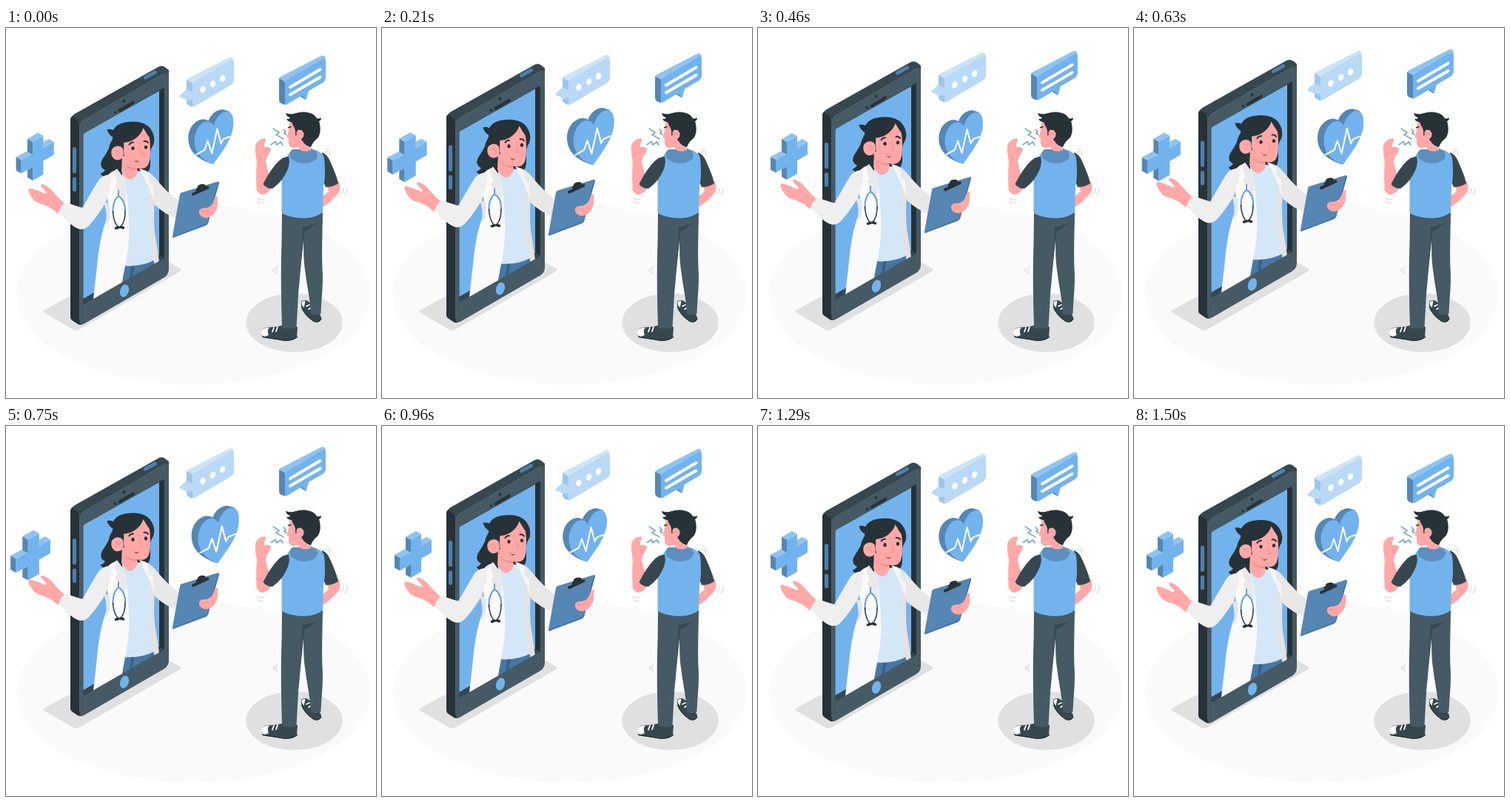
An HTML page for the animation above (1.54 s loop, 500x500 px).

```html
<!DOCTYPE html>
<html lang="en">
<head>
<meta charset="utf-8">
<title>Online doctor</title>
<style>
html, body { margin: 0; width: 100%; height: 100%; overflow: hidden; background: #fff; }
svg { display: block; width: 100vw; height: 100vh; }
.k { fill: #263238; } .g { fill: #37474f; } .m { fill: #455a64; }
.b { fill: #73b3ed; } .d { fill: #5586b4; } .t { fill: #8fc3f2; }
.s { fill: #ffa8a7; } .w { fill: #fff; }
.line { fill: none; stroke-linecap: round; stroke-linejoin: round; }
.mark { stroke: #dcdcdc; stroke-width: 1.2; }
</style>
</head>
<body>
<svg viewBox="0 0 500 500">
<defs>
  <clipPath id="sill"><path d="M90 100H240V296L119 365.5L90 382Z"/></clipPath>
</defs>

<ellipse cx="253.5" cy="360" rx="239" ry="122" fill="#fafafa"/>
<ellipse cx="389.5" cy="398.3" rx="65.2" ry="39.8" fill="#e0e0e0"/>
<path d="M52 381Q49 383 52 385L91 407.500Q95 410 99 407.500L235 329Q238 327 235 325L197 303Z" fill="#e0e0e0"/>

<!-- Patient -->
<g id="patient">
  <path class="g" d="M399 370C403 366 410 368 414 376C419 384 426 386 426 392C426 398 419 399 414 395C407 389 400 382 399 376Z"/>
  <path class="line" d="M399.500 377C402 386 411 393 416 396.500Q422 399 426 393" stroke="#263238" stroke-width="1.2"/>
  <path class="line" d="M406 376l4-2M409 380l4-2.500" stroke="#fff" stroke-width="1.6"/>
  <path class="w" d="M399.500 371q2-3 5-2l-2 9q-3-3-3-7"/>
  <path class="g" d="M373 402C366 404 357 404 350 405Q344 407 345 414Q346 418 352 419L378 422.500Q390 423 393 417L394 404Z"/>
  <path class="w" d="M356 405Q345 404 344.500 412Q344.500 416 350 417L355 415Q352 408 356 405Z"/>
  <path class="line" d="M347 417.500Q362 419.500 375 422Q387 423 393.500 417.500" stroke="#263238" stroke-width="1.5"/>
  <path class="line" d="M362 405l-2 5.500M367 404l-2 6" stroke="#fff" stroke-width="1.8"/>

  <path class="m" d="M373 248L428 246C428 275 426 300 428 335C428 355 426 370 425.500 386Q419 390 412 386C411 365 406 345 404.500 330C402 315 402 300 402 276C400 305 397 340 395 360L392.500 405Q382 408 373 405C372 370 371 330 372.500 290Z"/>
  <path class="g" d="M403 275Q412 271 421 263Q411 268 401 269Q400 300 397 330Q401 300 403 275Z"/>

  <path class="s" d="M434 212L450 207Q453 216 450 222C444 230 436 237 428 242L427 228Q433 223 436 221Z"/>
  <path class="g" d="M427 168Q434 171 437 178C442 189 447 200 449 210Q442 215 432 215L428 205Z"/>

  <path class="b" d="M386 166C378 172 378 179 380 186L372.500 200V250Q384 257 403 257Q420 256 428 249L429 214C432 204 431 186 430 176Q429 169 419 165Z"/>
  <path class="s" d="M347 217C341 222 339 223 338.500 216C338 202 338 190 339 182C338 173 336 166 337 159Q339 152 346 150Q353 148 351 153Q348 156 349 161Q353 160 357.500 162Q359 165 356 169Q352 174 351 180C352 188 355 196 357 200L361 213Q354 224 347 225Q341 225 339.500 219Z"/>
  <path class="g" d="M382 174C373 173 365 183 360 190C354 198 350 206 347.500 211Q352 217 360 217C369 211 377 201 381 190Q384 181 382 174Z"/>
  <path d="M387 164C382 168 382 174 387 178Q397 185 410 182Q421 179 421 172Q421 166 413 163Z" fill="#5c8fbe"/>
  <path class="s" d="M384 124C382 133 383 139 379.700 146Q379 148 382 149L382 157Q383 162 389 162L396 161L396 164Q403 169 412 165L411 150L405 126Z"/>
  <path class="k" d="M386 127Q381 127 379 123Q383 123 384 121Q379 120 378 115Q384 117 388 116C395 114 400 113 407 114Q416 115 420 122Q424 123 426 121Q426 125 423 126C426 135 425 144 421 149C416 153 414 156 412 161Q407 160 403 156Q398 150 396 144L391 145Q392 137 388 132Z"/>
  <path class="s" d="M393 145C391 139 395 136 399 138Q404 141 402 147Q399 152 394 150Z"/>
  <path class="line" d="M395 143q3-2 5 1" stroke="#f28f8f" stroke-width="1"/>
  <path class="line" d="M381.500 134.500l3.500-1" stroke="#263238" stroke-width="1.4"/>
  <path class="line" d="M361 136L369 141L365 144.500L375 150M358 157.500L364 153.500L366 158L371 154L374 158M375 137L378 140L376 142.500L379 144" stroke="#5793cf" stroke-width="1.4"/>
  <path class="line mark" d="M431 167q5-1 7 5M433 164q5 0 6 5M456 216q1 5-3 8M460 216q3 4-2 10M339 230q6 3 10 1M340 234.500q4 3 8 2M363 324q-4 2 0 7M367 322q-4 4-1 10"/>
</g>

<!-- Everything that drifts up and down -->
<g id="float">
  <path class="g" d="M88 124Q88 119 93 116L206 52.500Q211 50 215 53L220 57V70L100 140Z"/>
  <path class="k" d="M87 123Q88 119 91 119L101 126L103 400.500Q99 402 96 399.500L90 395.500Q87 394 87 390Z"/>
  <path class="m" d="M99.500 134Q99.500 128 104 125L213 61.500Q220 58 220 64V326Q220 333 214 337L106 399.500Q99.500 403 99.500 396Z"/>
  <path class="line" d="M90 119.500L99 126Q99.500 128 99.500 134V395" stroke="#607580" stroke-width=".6"/>
  <path class="line" d="M100 129Q101 127 104 125L213 61.500" stroke="#607580" stroke-width=".6"/>
  <path class="line" d="M188.500 67L201.500 59.800" stroke="#4d7fae" stroke-width="5"/>
  <path class="line" d="M92.500 163.500V194M92.500 204V218.500" stroke="#4d7fae" stroke-width="5"/>
  <path class="line" d="M153.500 111.500L172 100.500" stroke="#263238" stroke-width="4"/>
  <circle class="k" cx="147.500" cy="114" r="1.800"/><circle class="k" cx="159.500" cy="98.500" r="2"/>
  <path class="k" d="M104.500 145Q104.500 143 106 142L212 81.500Q214 80.500 214 83V309Q214 311 212 312L107 372Q104.500 373 104.500 371Z"/>
  <path class="b" d="M104.500 145Q104.500 143 106 142L207 85V307L104.500 366Z"/>
  <path class="g" d="M104.500 366L207 307L214 311L106 372.500Q104.500 373 104.500 371Z"/>
  <ellipse class="b" cx="160" cy="355" rx="5.800" ry="8.700" transform="rotate(18 160 355)"/>

  <!-- Doctor -->
  <path class="k" d="M145 148Q138 144 136.500 137Q141 136 145 138C149 130 159 126.500 171 126.500C184 126 193 131 197 139C201 146 201 153 199 158C194 165 194 174 195 181Q196 194 187 199L176 200L148 203Q134 205 127.500 197Q132 195 134 192Q126 188 129 180C133 172 139 166 140 158Z"/>
  <g clip-path="url(#sill)">
    <path d="M158 316L204 306L208 330L155 352Z" fill="#4877a4"/>
    <path d="M169 321l5-1-4 20h-3Z" fill="#38608a"/>
    <path d="M157 192L189 194L201 220L200 256L202 313Q181 324 157 321Z" fill="#d4e7f9"/>
    <path d="M150 191C139 195 133 202 132 214C137 228 140 238 137 256C129 274 125 300 123 322L117 375L155 360C157 335 165 310 166 284C167 258 164 222 160 204Z" fill="#fafafa"/>
    <path d="M132 235Q138 251 134 269Q143 258 140 238Z" fill="#e6e6e6"/>
    <path d="M186 194L201 220L199 246C197 263 203 282 207 316L201 321C196 295 192 280 193 260C196 235 192 215 186 194Z" fill="#e3e3e3"/>
  </g>
  <path class="s" d="M157 172L176 184L178 194Q176 203 168 205Q161 204 156 194Z"/>
  <path d="M159 183Q168 190 177 189L177.500 192Q166 192 159 183Z" fill="#f28f8f"/>
  <path class="s" d="M157 150L186 134Q194 143 194.500 153C195.500 165 195 177 193 183Q190 190.500 182 190Q169 189 161 183Z"/>
  <path class="k" d="M144 145C150 130 178 126 188 133Q196 140 197 152Q191 145 185.500 135C182 147 170 154 159 155Q160 164 157 174L153 175Q144 160 144 145Z"/>
  <path class="s" d="M158 163C154 157 144 159 142.500 166C141 174 147 180 153 178Q158 177 159 170Z"/>
  <path class="line" d="M147 167q5-3 7 3" stroke="#f28f8f" stroke-width="1"/>
  <ellipse class="k" cx="171.500" cy="162.500" rx="2.200" ry="2.600"/><ellipse class="k" cx="189" cy="161" rx="2.200" ry="2.600"/>
  <path class="line" d="M166.500 157.500Q168 154.500 172 154.500M186.500 153Q190 152 192 155" stroke="#263238" stroke-width="2"/>
  <path class="line" d="M181 162L184.500 171L181 172.500" stroke="#f28f8f" stroke-width="1.100"/>
  <path d="M172 177Q176 179 180 177.500Q179 182 175.500 181Q173 180 172 177Z" fill="#a8484c"/>
  <path class="line" d="M173 178.500Q176 179.500 179 178.500" stroke="#fff" stroke-width=".9"/>

  <path class="s" d="M79 237Q72 231 66 224C61 217 54 212 49 211Q45 212 49 216L55 222L53 224Q43 219 33 216.500Q29 217 31 222C35 231 40 236 48 238C56 240 63 244 70 251Z"/>
  <path d="M143 198C132 198 127 202 123 209C116 220 110 232 103 243L80 235.500Q74 240 71.500 249C80 259 92 271 101 272Q108 272 113 266C121 257 129 246 135 235Q142 216 143 198Z" fill="#efefef"/>
  <path d="M102 243l5-1" stroke="#d5d5d5" stroke-width="1"/>
  <path d="M150 190Q146 193 147 200L151 210L147 214L161 239Q164 222 160 204Z" fill="#e9e9e9"/>
  <path d="M183 191Q194 193 202 203C212 215 221 225 234 234L230 257Q215 252 201 239L195 218Z" fill="#e8e8e8"/>
  <path d="M180 190Q189 192 192 198L193 208L199 213L200 235Q195 218 180 190Z" fill="#f5f5f5"/>
  <path class="line" d="M152 220V227C145 233 144 241 144.500 250M152 227C160 232 161.500 240 161 249" stroke="#5d9bd7" stroke-width="1.900"/>
  <path class="line" d="M144.500 248Q145 261 151 268.500M161 248Q161 262 155 268.500" stroke="#37474f" stroke-width="1.600"/>
  <path class="line" d="M148.500 270.500L152 269.500M155 269L158.500 270" stroke="#263238" stroke-width="3.500"/>

  <path class="d" d="M237 222.500L286 207.500Q288.500 207 288 210L273 263Q272.500 266 270 267L227 283Q224 284 225 281L235 225Q235.500 223 237 222.500Z"/>
  <path class="line" d="M287 208.500L272.500 264L226 282.500" stroke="#3f6c98" stroke-width="1"/>
  <path class="line" d="M253 224.500L272.500 215.500" stroke="#263238" stroke-width="4"/>
  <path class="k" d="M257 222V217Q259 217 259 214Q261 211 265 211Q269 210.500 270 213V217Z"/>
  <path class="s" d="M285.500 227Q287 227 286 233C287 240 285 246 281 251C276 257 270 258 265 255Q260 252 261 247Q262 243 271 243Q278 241 280 235Q282 228 285.500 227Z"/>
  <path class="line" d="M264 248q5 0 9-1" stroke="#f28f8f" stroke-width=".8"/>

  <!-- Speech bubbles -->
  <path d="M244 71Q244 69 246 68L302 39.500Q306 38 308 42L252 76Z" fill="#cde3f8"/>
  <path d="M244 70L252 74.500V107L246 104Q244 103 244 100V97L234 92.500L244 83Z" fill="#9dc5ea"/>
  <path d="M234 92.500L244 83L252 87V97L246 98Z" fill="#b9d9f6"/>
  <path d="M252 77Q252 74 255 72L303 44Q308 41 308 46V70Q308 74 304 77L255 106Q252 108 252 104Z" fill="#b9d9f6"/>
  <g class="w">
    <ellipse cx="266" cy="83" rx="3.500" ry="4.600" transform="rotate(18 266 83)"/>
    <ellipse cx="279.500" cy="75.300" rx="3.500" ry="4.600" transform="rotate(18 279.500 75.300)"/>
    <ellipse cx="292.500" cy="67.800" rx="3.500" ry="4.600" transform="rotate(18 292.500 67.800)"/>
  </g>
  <path class="t" d="M369 69Q369 67 371 66L426 37.500Q430 36 432 40L377 74Z"/>
  <path class="d" d="M369 68L377 72.500V104L371 101.500Q369 100 369 97Z"/>
  <path class="d" d="M397 92l8 5 2-8Z"/>
  <path class="b" d="M377 75Q377 72 380 70L427 42Q432 39 432 44V67Q432 71 428 74L409 85L405.500 97L400 91L380 103Q377 105 377 101Z"/>
  <path class="line" d="M384 80L424.500 56M384 90L424.500 66.500" stroke="#fff" stroke-width="4"/>
</g>

<!-- Cross and heart beat together -->
<g id="beat">
  <path class="t" d="M32 150L46 142L53 146L39 154ZM17 174L32 166L39 170L24 178ZM53 158L53 154L60 150L67 154L53 162Z"/>
  <path class="d" d="M32 150L39 154V171L32 167ZM17 174L24 178V195.500L17 191.500ZM32 191L39 187V205L32 201Z"/>
  <path class="b" d="M39 154L53 146V162L67 154V171L53 179V197L39 205V187L24 195.500V178L39 170Z"/>
  <path class="d" d="M277 183.500C262 179 249 171 245.500 158C242 145 246 132 257 126Q264 122 271 126C274 117 283 110 291 111.500L299 114L290 140Z"/>
  <path class="b" d="M277.500 183.500C263 178.500 253.500 169 252.500 155C252 143 257 132 265 128Q274 125 278 133C281 121 289 113 296 114Q304 115 304 129C304 149 289 167 277.500 183.500Z"/>
  <path class="line" d="M255 170.500L266 164.500L270 152.500L275.500 169L282.500 137L287.500 156L290.500 150.500L299 147" stroke="#fff" stroke-width="2"/>
</g>
</svg>
<script>
const LOOP = 1540, CYCLE = 1500, LEAD = 36, RISE = 10;
const cx = 160.5, cy = 158.5;
const pulse = [[0, 1], [.1, 1.1], [.3, 1], [.4, 1], [.5, 1.1], [.6, 1], [1, 1]];
const floating = document.getElementById("float");
const beating = document.getElementById("beat");

function along(keys, p) {
  const i = Math.max(1, keys.findIndex(k => k[0] >= p));
  const [a, u] = keys[i - 1], [b, v] = keys[i];
  return u + (v - u) * (p - a) / (b - a);
}

const lift = p => RISE * (1 - Math.abs(2 * p - 1));

function draw(time) {
  const p = Math.min(1, (time % LOOP + LEAD) / CYCLE);
  const dy = lift(LEAD / CYCLE) - lift(p);
  const s = along(pulse, p);
  floating.setAttribute("transform", `translate(0 ${dy})`);
  beating.setAttribute("transform", `translate(${cx} ${cy}) scale(${s}) translate(${-cx} ${-cy})`);
}

let start;
function tick(now) {
  start ??= now;
  draw(now - start);
  requestAnimationFrame(tick);
}
draw(0);
requestAnimationFrame(tick);
</script>
</body>
</html>
```
